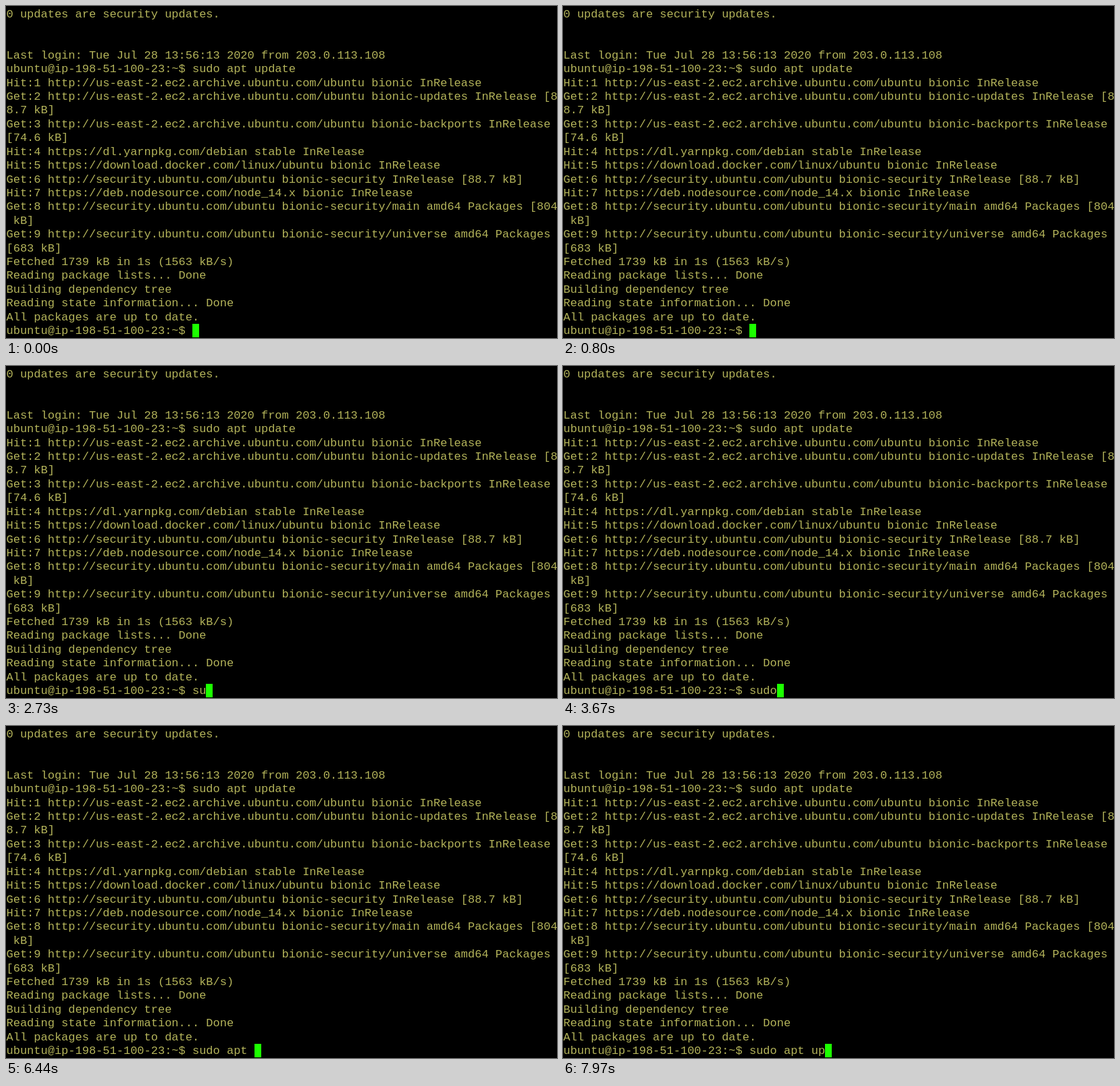
Recreate the animation shown at these times as an HTML page with a canvas. Size 816x492 px, loop 8 s.

```html
<!DOCTYPE html>
<html lang="en">
<head>
<meta charset="utf-8">
<title>Terminal</title>
<style>
  html, body { margin: 0; width: 100%; height: 100%; overflow: hidden; background: #000; }
  canvas { display: block; }
</style>
</head>
<body>
<canvas id="screen" width="816" height="492"></canvas>
<script>
const LOOP = 8000;
const COLUMN = 10.2, ROW = 20.41, BASELINE = 16.6;
const PROMPT = 'ubuntu@ip-198-51-100-23:~$ ';
const COMMAND = 'sudo apt up';
// Time in ms at which each character of the command appears
const KEY_TIMES = [2430, 2700, 2930, 3170, 4300, 5100, 5330, 5570, 5740, 6700, 7000];

const EC2 = 'http://us-east-2.ec2.archive.ubuntu.com/ubuntu bionic';
const SECURITY = 'http://security.ubuntu.com/ubuntu bionic-security';
const LINES = [
  '0 updates are security updates.',
  '',
  '',
  'Last login: Tue Jul 28 13:56:13 2020 from 203.0.113.108',
  PROMPT + 'sudo apt update',
  `Hit:1 ${EC2} InRelease`,
  `Get:2 ${EC2}-updates InRelease [8`,
  '8.7 kB]',
  `Get:3 ${EC2}-backports InRelease`,
  '[74.6 kB]',
  'Hit:4 https://dl.yarnpkg.com/debian stable InRelease',
  'Hit:5 https://download.docker.com/linux/ubuntu bionic InRelease',
  `Get:6 ${SECURITY} InRelease [88.7 kB]`,
  'Hit:7 https://deb.nodesource.com/node_14.x bionic InRelease',
  `Get:8 ${SECURITY}/main amd64 Packages [804`,
  ' kB]',
  `Get:9 ${SECURITY}/universe amd64 Packages`,
  '[683 kB]',
  'Fetched 1739 kB in 1s (1563 kB/s)',
  'Reading package lists... Done',
  'Building dependency tree',
  'Reading state information... Done',
  'All packages are up to date.'
];

const ctx = document.getElementById('screen').getContext('2d');

function drawLine(text, row) {
  ctx.fillText(text, 0.5, row * ROW + BASELINE);
}

function draw(now) {
  const time = now % LOOP;
  const typed = KEY_TIMES.filter(t => t <= time).length;
  const input = PROMPT + COMMAND.slice(0, typed);

  ctx.fillStyle = '#000';
  ctx.fillRect(0, 0, 816, 492);
  ctx.font = '17px "Liberation Mono", monospace';
  ctx.fillStyle = '#b4b45a';
  LINES.forEach(drawLine);
  drawLine(input, LINES.length);

  ctx.fillStyle = '#1cff00';
  ctx.fillRect(Math.round(input.length * COLUMN + 0.3), 471, 10, 20);
  requestAnimationFrame(draw);
}
requestAnimationFrame(draw);
</script>
</body>
</html>
```
